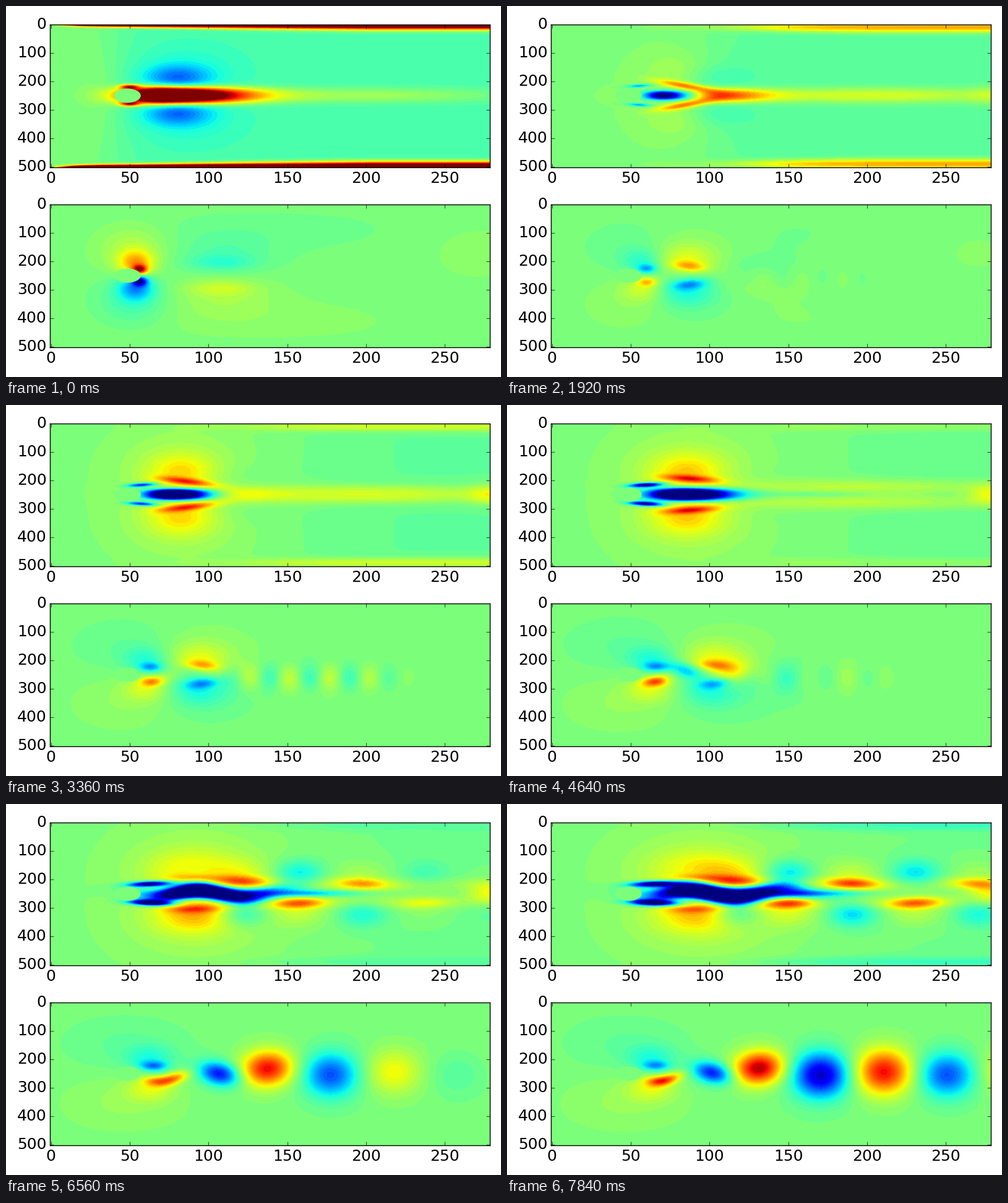
A matplotlib script for the animation above (8000 ms loop, 800 px wide and 600 px high).

```python
import numpy as np
import matplotlib.pyplot as plt
from matplotlib.animation import FuncAnimation
from matplotlib.patches import Ellipse

plt.rcParams.update({
    "font.family": "DejaVu Sans", "font.size": 18, "axes.linewidth": 1.0,
    "xtick.direction": "in", "ytick.direction": "in",
    "xtick.top": True, "ytick.right": True,
    "xtick.major.size": 4, "ytick.major.size": 4,
    "xtick.major.width": 0.5, "ytick.major.width": 0.5,
    "xtick.major.pad": 4, "ytick.major.pad": 4, "ytick.alignment": "center",
})

STEP = 0.16          # seconds per frame
FRAMES = 50
HEIGHT = 502
MID = 250
SHED = 0.7           # time between two vortices leaving the body
CLOCK = 7.2          # moment at which vortex m has age m

x = np.linspace(0, 279, 280, dtype=np.float32)
y = np.linspace(0, HEIGHT, 201, dtype=np.float32)[:, None]
dy = y - MID


def smooth(s):
    s = np.clip(s, 0, 1)
    return s * s * (3 - 2 * s)


def sigmoid(s):
    return 1 / (1 + np.exp(-np.clip(s, -40, 40)))


def blob(cx, cy, sx, sy, a, slope=0.0, tail=0.0):
    """Sheared Gaussian; tail mixes in a slowly fading skirt."""
    dx = x - cx
    r2 = (dx / sx) ** 2 + ((dy - cy - slope * dx) / sy) ** 2
    out = (1 - tail) * np.exp(-r2)
    if tail:
        out = out + tail / (1 + r2 / 2)
    return a * out


def pair(sign, cx, cy, sx, sy, a, slope=0.0, tail=0.0):
    """Blob above the centre line and its reflection below."""
    return (blob(cx, -cy, sx, sy, a, slope, tail)
            + blob(cx, cy, sx, sy, sign * a, -slope, tail))


def wake(cx, left, right, half, a, sway=0):
    dx = x - cx
    along = np.where(dx < 0, (dx / left) ** 2, np.abs(dx / right) ** 1.8)
    return a * np.exp(-along - np.abs((dy - sway) / half) ** 2.4)


def path(age):
    return np.interp(age, [-1, 0, 2, 7], [62, 75, 134, 334])


def street(t):
    """Age, sign and strength of every vortex shed so far."""
    for m in range(-2, 8):
        age = m + (t - CLOCK) / SHED
        if -1.3 < age < 6.5:
            born = sigmoid(1.35 * (4.45 - m))
            grown = np.clip(0.55 + 0.25 * age, 0, 1) * smooth((age + 1.3) / 0.9)
            yield age, (1 if m % 2 else -1), 0.95 * born * grown


def wall_layer(t):
    a = 1.4 * np.exp(-t / 3.4) - 0.27 + 0.6 * np.exp(-t / 0.5)
    settled = 1 - np.exp(-t / 0.8)
    thick = 5 + 13 * np.minimum(x / 200, 1) ** 0.7
    near = np.minimum(y, HEIGHT - y)
    rise = sigmoid((x - 10 - 130 * settled) / (5 + 15 * settled))
    return a * rise * np.exp(-((near - 13 * settled) / thick) ** 2)


def along_flow(t):
    grow = smooth((t - 0.8) / 3)
    late = smooth((t - 4.8) / 1.6)
    start = np.exp(-t / 1.4)
    settled = 1 - np.exp(-t / 0.8)

    f = wall_layer(t)
    f = f - 0.12 * np.exp(-t / 5) * sigmoid((x - 42 - 150 * smooth(t / 4.5)) / (9 + 2 * t))
    f = f + blob(30, 0, 14, 160, 0.04 * start)
    f = f + blob(75 + 3 * t, 0, 40 + 3 * t, 300, 0.07 * grow)

    # starting wake, then the reversed core that replaces it
    f = f + wake(72 + 39 * settled, 25 - 5 * settled, 48 - 18 * settled,
                 28 - 5 * settled, 2.2 * np.exp(-t / 1.6))
    f = f + pair(1, 50, 30, 6, 8, 0.8 * start ** 3)
    f = f + pair(1, 80 + 12 * t, 64, 20, 40, -0.32 * start)
    f = f + pair(1, 86 + 12 * t, 85, 32, 85, -0.11 * start)
    cx = 62 + 4.9 * t
    sway = 10 * late * np.cos(2 * np.pi * (x - 90 - 42 * (t - CLOCK)) / 60)
    f = f + wake(cx, 0.75 * (cx - 55), 6 + 5.3 * t, 12 + 2 * t,
                 -2.1 * (1 - np.exp(-(t / 2.1) ** 2)), sway)

    # thin layers leaving the body, bright rims and the lobes around them
    f = f + pair(1, 52 + 1.7 * t, 33, 5 + 1.3 * t, 4 + 0.8 * t,
                 -min(0.24 * t, 1.2), -0.4 + 0.03 * t)
    f = f + pair(1, 81 + 1.5 * t, min(20 + 7.5 * t, 56), 17, 12,
                 0.5 * smooth(t / 1.9) * (1 - 0.65 * late),
                 max(0.9 - 0.2 * max(t - 1.9, 0), 0.1))
    f = f + pair(1, 74 + 2.5 * t, 80, 16 + 1.3 * t, 58, 0.23 * grow)
    f = f + pair(1, 74 + 2.5 * t, 100, 26 + 2 * t, 100, 0.09 * grow)

    # far wake splitting into two strands
    f = f + pair(1, 205, 28 * smooth((t - 2) / 3), 85, 26,
                 0.1 + 0.07 * smooth(t / 3) - 0.06 * late)
    f = f + blob(279, 0, 14, 34, min(0.07 * t, 0.28))
    f = f + blob(165, 0, 32, 11, -0.32 * smooth((t - 3.4) / 3))

    for age, s, a in street(t):
        if age > -0.5:
            mid = path(age + 0.5)
            a *= late * smooth(age + 0.5)
            f = f + blob(mid, s * max(58 - 10 * (age + 0.5), 34), 17, 18, 0.55 * a, -0.2 * s)
            f = f + blob(mid, s * 65, 18, 50, 0.18 * a)
            f = f + blob(mid, -s * 72, 15, 45, -0.34 * a)
    return f


def cross_flow(t):
    start = np.exp(-t / 1.5)

    # dipole at the body, which turns over soon after the start
    g = 1.45 * np.exp(-(t / 0.9) ** 2) - 0.45
    s = min(t / 4.8, 1)
    cx = 56.5 + 10 * s
    f = pair(-1, cx, 20 + 7 * s, 4.5 + 3.5 * s, 16, 0.75 * g)
    f = f + pair(-1, 54 + 9 * s, 42 + 12 * s, 11 + 4 * s, 44, 0.42 * g)
    f = f + pair(-1, 52 - 6 * s, 90 + 10 * s, 22 + 14 * s, 85 + 15 * s, 0.14 * g)

    # second dipole at the end of the core
    a = smooth((t - 0.5) / 1.3) * (1 - smooth((t - 4.5) / 1.2))
    cx = 76 + 6 * t
    f = f + pair(-1, cx, 32, 10, 17, 0.3 * a, 0.5)
    f = f + pair(-1, cx - 2, 50, 18, 58, 0.23 * a)
    f = f + pair(-1, cx + 6, 95, 42, 110, 0.05 * a)

    # weak remains of the start, carried off
    f = f + pair(-1, 108 + 12 * t, 44, 21, 28, -0.13 * start)
    f = f + pair(-1, 110 + 12 * t, 75, 32, 75, -0.09 * start)
    f = f + pair(-1, 140, 165, 80, 85, -0.04 * np.exp(-t / 3))
    f = f + blob(270, -80, 30, 100, 0.04 * np.exp(-t / 4))

    # fine ripple before regular shedding sets in
    ripple = 0.15 * np.exp(-((t - 3.5) / 1.2) ** 2 - ((x - 165) / 55) ** 4)
    wave = np.cos(2 * np.pi * (x - 126 - 48 * (t - 3.36)) / 25.5)
    f = f + ripple * wave * np.exp(-((dy - 12) / 45) ** 2)

    for age, s, a in street(t):
        n = max(age, 0)
        off = np.interp(n, [0, 1.9, 3], [20, -18, -5])
        f = f + blob(path(age), s * off, min(9 + 3.2 * n, 17), min(18 + 20 * n, 76),
                     s * a, -1.4 * s * max(0, 1 - n / 2.5), 0.14)
    return f * (1 - np.abs(dy / 252) ** 8)


fig = plt.figure(figsize=(8, 6), dpi=100, facecolor="white")
jet = plt.get_cmap("jet", 51)


def panel(bottom):
    ax = fig.add_axes([71.3 / 800, 1 - bottom / 600, 710.7 / 800, 231 / 600])
    im = ax.imshow(np.zeros((len(y), len(x))), cmap=jet, vmin=-1, vmax=1,
                   aspect="auto", interpolation="bilinear",
                   extent=(-.5, 279.5, HEIGHT + 1.25, -1.25))
    ax.add_patch(Ellipse((48.5, MID), 17, 50, fc=jet(25), ec="none"))
    ax.set_xlim(-.5, 278.5)
    ax.set_ylim(HEIGHT, 0)
    ax.set_xticks(range(0, 251, 50))
    ax.set_yticks(range(0, 501, 100))
    return im


images = [panel(261), panel(552)]


def update(n):
    t = n * STEP
    images[0].set_data(along_flow(t))
    images[1].set_data(cross_flow(t))
    return images


anim = FuncAnimation(fig, update, frames=FRAMES, interval=160, repeat=True,
                     repeat_delay=0, blit=False)
plt.show()
```
